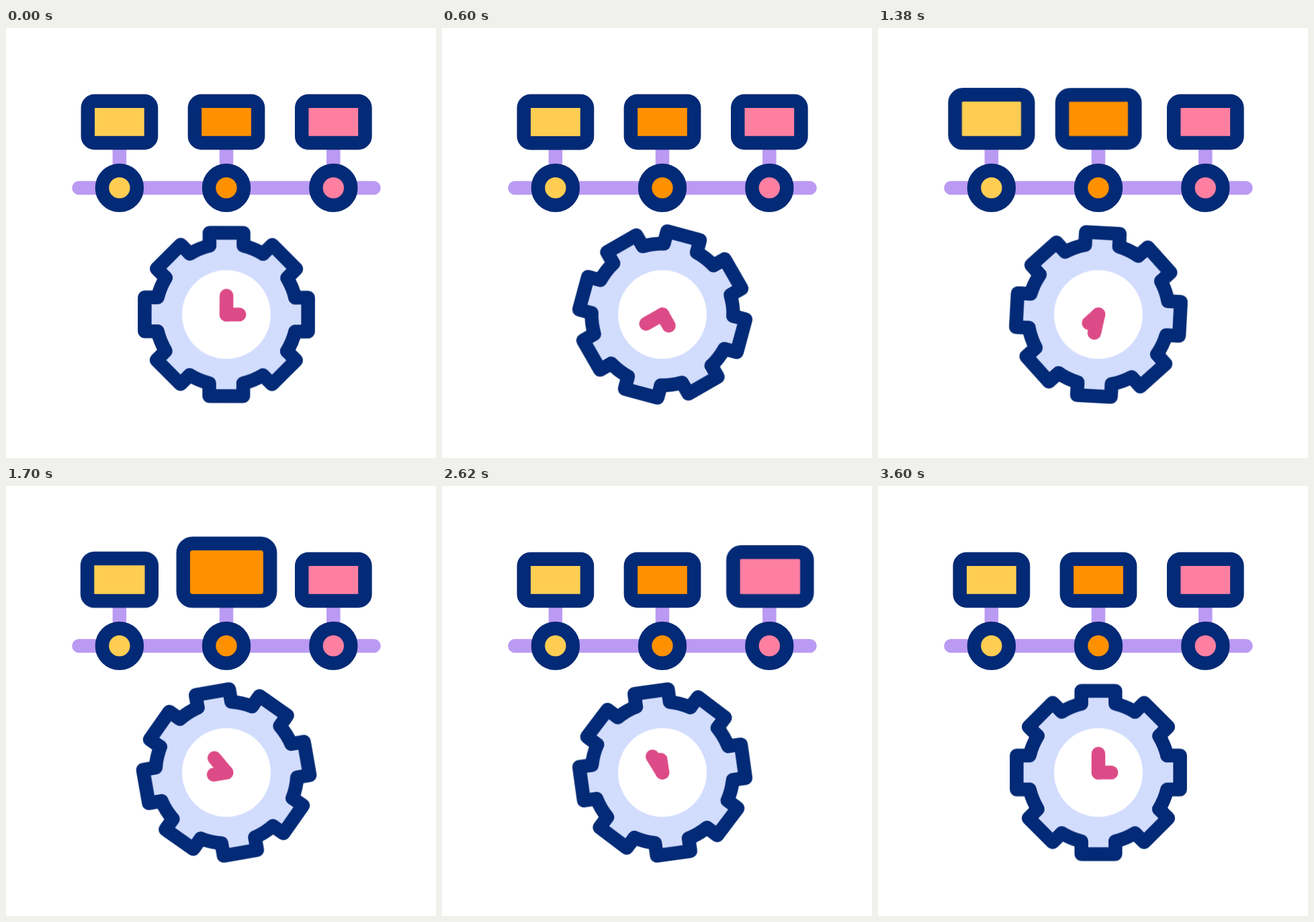
An HTML page without scripts that plays this animation: 640 px wide and 640 px high, repeating every 3620 ms.

```html
<!DOCTYPE html>
<html lang="en">
<head>
<meta charset="utf-8">
<title>Timeline and gear clock</title>
<style>
  html, body { margin: 0; width: 100%; height: 100%; overflow: hidden; background: #fff; }
  svg { display: block; width: 100vw; height: 100vh; }

  .outline { stroke: #032a76; stroke-width: 20.5; stroke-linecap: round; stroke-linejoin: round; }
  .rail { stroke: #bb9af3; stroke-width: 20.5; stroke-linecap: round; fill: none; }
  .hand { stroke: #dc4b87; stroke-width: 20.5; stroke-linecap: round; }
  .yellow { fill: #fecd52; }
  .orange { fill: #ff9100; }
  .pink { fill: #ff7fa1; }

  .box, .spin { animation: 3620ms linear infinite; }
  .box { vector-effect: non-scaling-stroke; }
  .box.yellow { transform-origin: 168.9px 171.1px; animation-name: grow-yellow; }
  .box.orange { transform-origin: 327px 171.1px; animation-name: grow-orange; }
  .box.pink { transform-origin: 481.6px 171.1px; animation-name: grow-pink; }
  .spin { --turn: 360deg; animation-name: spin; }
  .fast { --turn: 1440deg; }

  /* Turning takes 3600 ms, then rests for the last 20 ms. */
  @keyframes spin {
    from { transform: rotate(0deg); }
    99.448%, to { transform: rotate(var(--turn)); }
  }
  @keyframes grow-yellow {
    0%, 16.57%, 48.07%, 100% { transform: scale(1); }
    32.32% { transform: scale(1.242); }
  }
  @keyframes grow-orange {
    0%, 32.32%, 64.92%, 100% { transform: scale(1); }
    48.34% { transform: scale(1.408); }
  }
  @keyframes grow-pink {
    0%, 48.34%, 83.7%, 100% { transform: scale(1); }
    65.06% { transform: scale(1.275); }
  }
</style>
</head>
<body>
<svg viewBox="0 0 640 640">
  <defs>
    <path id="tooth" d="M-25.3-102.4V-121.6H25.3V-102.4A105.5 105.5 0 0 1 54.5-90.3"/>
    <g id="pair">
      <use href="#tooth"/>
      <use href="#tooth" transform="rotate(45)"/>
    </g>
    <g id="ring">
      <use href="#pair"/>
      <use href="#pair" transform="rotate(90)"/>
      <use href="#pair" transform="rotate(180)"/>
      <use href="#pair" transform="rotate(270)"/>
    </g>
  </defs>

  <path class="rail" d="M108.5 237.9H547.5M168.9 180V205M328 180V205M487.3 180V205"/>

  <g class="outline">
    <circle class="yellow" cx="168.9" cy="237.9" r="25.9"/>
    <circle class="orange" cx="328" cy="237.9" r="25.9"/>
    <circle class="pink" cx="487.3" cy="237.9" r="25.9"/>
    <rect class="box yellow" x="121.8" y="108.8" width="94.2" height="62.3" rx="10.2"/>
    <rect class="box orange" x="280.9" y="108.8" width="94.2" height="62.3" rx="10.2"/>
    <rect class="box pink" x="440.2" y="108.8" width="94.2" height="62.3" rx="10.2"/>
  </g>

  <g transform="translate(328 426.4)">
    <g class="spin">
      <g fill="#d2dcfd">
        <circle r="105"/>
        <use href="#ring"/>
      </g>
      <use href="#ring" class="outline" fill="none"/>
    </g>
    <circle r="66" fill="#fff"/>
    <path class="hand spin" d="M0 0H19.2"/>
    <path class="hand spin fast" d="M0 0V-28"/>
  </g>
</svg>
</body>
</html>
```
